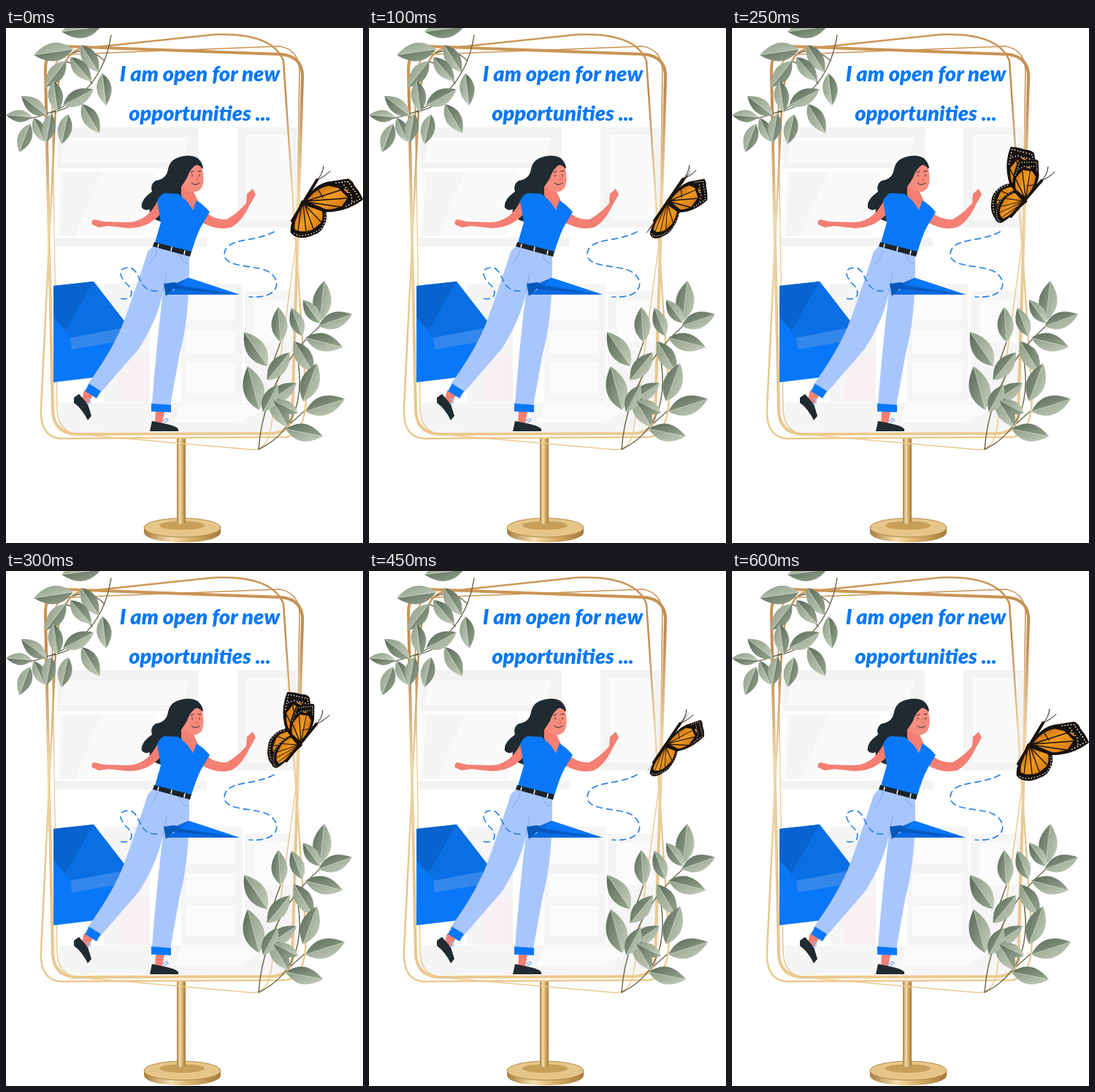
These frames come from a looping animation (489x705 px, 0.65 s). An HTML page:

```html
<!DOCTYPE html>
<html lang="en">
<meta charset="utf-8">
<title>Open for new opportunities</title>
<style>
html, body { margin: 0; width: 100%; height: 100%; overflow: hidden; background: #fff }
svg { display: block; width: 489px; height: 705px }
text { font: italic 900 29px Lato, "Open Sans", sans-serif; fill: #0878f8; text-anchor: middle }
.line { fill: none; stroke-linecap: round; stroke-linejoin: round }
</style>
<svg viewBox="0 0 489 705">
  <defs>
    <linearGradient id="gold" gradientUnits="userSpaceOnUse" x1="0" y1="20" x2="60" y2="570">
      <stop offset="0" stop-color="#cf9a58"/><stop offset=".2" stop-color="#c08a50"/>
      <stop offset=".45" stop-color="#f0d6a8"/><stop offset=".75" stop-color="#e6c48c"/>
      <stop offset="1" stop-color="#ecc98f"/>
    </linearGradient>
    <linearGradient id="metal">
      <stop offset="0" stop-color="#a87c3c"/><stop offset=".35" stop-color="#f3dfae"/>
      <stop offset=".6" stop-color="#d9b26c"/><stop offset="1" stop-color="#a5793a"/>
    </linearGradient>
    <linearGradient id="pale" x2="1" y2="1">
      <stop offset="0" stop-color="#8d9d87"/><stop offset="1" stop-color="#c3ccba"/>
    </linearGradient>
    <linearGradient id="deep" x2="1" y2="1">
      <stop offset="0" stop-color="#596b59"/><stop offset="1" stop-color="#98a690"/>
    </linearGradient>
    <linearGradient id="orange" x2="1" y2="1">
      <stop offset="0" stop-color="#b85a0c"/><stop offset=".5" stop-color="#ef9a20"/>
      <stop offset="1" stop-color="#cf7010"/>
    </linearGradient>
    <g id="wing">
      <path fill="#17110d" d="M405 236L438 249Q441 262 436 270Q432 280 422 283Q412 288 403 287Q394 286 390 280Q389 270 394 262Z"/>
      <path fill="url(#orange)" d="M405 241L433 251Q435 262 430 268L420 276Q406 281 396 276Q394 268 398 260Z"/>
      <path class="line" stroke="#17110d" stroke-width="1.3" d="M405 240L400 278M407 241L411 278M409 242L421 275M410 243L431 265"/>
      <path class="line" stroke="#fff" stroke-width="1.6" stroke-dasharray="0 4" d="M437 255Q438 266 432 274Q420 284 404 284Q396 284 393 279"/>
      <path fill="#17110d" d="M408 239Q420 216 440 211L469 207Q475 209 478 217Q486 226 489 235Q480 242 470 246Q455 252 438 252Z"/>
      <path fill="url(#orange)" d="M412 237Q423 220 442 216L455 219L468 232L460 244Q448 249 438 248Z"/>
      <path class="line" stroke="#17110d" stroke-width="1.4" d="M411 237L458 222M411 237L467 233M411 238L458 245M428 222L434 232"/>
      <path class="line" stroke="#fff" stroke-width="1.7" stroke-dasharray="0 4.2" d="M452 212L468 210Q474 218 485 234L464 245M463 215L473 229L474 238"/>
      <path class="line" stroke="#e08a20" stroke-width="2" d="M464 221l4 4"/>
    </g>
  </defs>

  <g id="room">
    <path fill="#f3f3f3" d="M70 136H264V192H70ZM66 287H275V299H66ZM317 136H398V273H317Z"/>
    <path fill="#fafafa" d="M82 150H250L240 184H75ZM72 196H205L190 285H72ZM330 146H391V262H330Z"/>
    <path fill="#f5f5f5" d="M78 197H132L94 285H74ZM134 350H197V512H134ZM240 350H324V512H240ZM327 360H398V512H327Z"/>
    <path fill="#fbfbfb" d="M247 364H314V401H247ZM247 414H314V446H247ZM247 458H314V500H247ZM339 372H390V430H339Z"/>
    <path fill="#f8f0f2" d="M155 447H197V512H155Z"/>
    <path fill="#f5f5f5" d="M72 513H390V553H72Z"/>
    <path fill="#fbfbfb" d="M240 515H365L320 540H230Z"/>
  </g>

  <g id="stand">
    <path fill="url(#metal)" d="M189 684V690C189 709 294 709 294 690V684Z"/>
    <ellipse cx="241.500" cy="684" rx="52.500" ry="13" fill="#e6c688" stroke="#b18a49"/>
    <ellipse cx="241" cy="681" rx="31" ry="6" fill="#c89f59"/>
    <path fill="url(#metal)" d="M234 562H246V677Q240 681 234 677Z"/>
  </g>

  <g class="line" stroke="url(#gold)">
    <path stroke-width="4" d="M78 25L378 36Q408 40 406 70L392 530Q390 553 365 555L95 556Q66 554 64 525L54 60Q53 28 78 25Z"/>
    <path stroke-width="2.500" d="M68 110Q72 32 105 28L285 9Q365 6 380 45L411 500Q411 555 385 560L75 562Q46 560 48 520Z"/>
    <path stroke-width="1.500" d="M63 85Q60 37 90 36L375 25Q402 30 402 60L398 290L364 540Q360 580 335 577L95 556Q70 550 70 520Z"/>
  </g>

  <text x="265.500" y="73">I am open for new</text>
  <text x="265.500" y="127">opportunities ...</text>

  <g id="box">
    <path fill="#0878f8" d="M65 353L120 347L168 409L167 432L141 476L65 485Z"/>
    <path fill="#0763cd" d="M65 353L120 347L82 415L65 396Z"/>
    <path fill="#0a6fe4" d="M120 347L168 409L88 424L80 415L102 382Z"/>
    <path fill="#3387ea" d="M88 424L168 409L167 427L90 440Z"/>
  </g>

  <g id="woman">
    <path fill="#1f2b31" d="M270 191Q266 173 246 175Q225 177 222 193Q220 207 205 209Q197 214 200 224Q184 235 186 246Q190 251 197 248Q194 260 212 265Q232 260 243 226Z"/>
    <path fill="#f47f72" d="M208 236C196 260 180 266 165 266L134 265L121 262Q116 264 118 269L127 273L140 271L168 274C190 274 204 264 214 252ZM276 254Q288 263 302 262Q317 254 329 240L330 227L338 220L342 228L334 242Q322 267 308 273Q290 278 268 266Z"/>
    <path fill="#f47f72" d="M240 213L240 229L256 249L263 237L256 222Z"/>
    <path fill="#f78c7e" d="M246 191Q264 183 269 193Q273 211 267 220Q257 229 246 220Q239 217 241 208Z"/>
    <path fill="#1f2b31" d="M267 184Q253 189 248 205Q240 219 234 223L231 193Q240 176 258 177Z"/>
    <path class="line" stroke="#1f2b31" d="M253 198l4 -2M263 196l4 0M255 201v2M265 201v2M254 212Q259 217 265 212"/>
    <path class="line" stroke="#e16962" d="M261 202l2 6h-3"/>
    <path fill="#0878f8" d="M207 237Q210 229 217 226L236 227Q248 235 256 249L261 236Q272 243 279 252L267 272Q260 286 254 307L204 294L212 266Z"/>
    <path fill="#a8c6fc" d="M202 298L251 311Q252 395 238 445L225 517L200 515Q206 435 215 362Q207 400 182 439L129 500L111 489Q148 438 162 400Q183 342 194 306Z"/>
    <path class="line" stroke="#7ea9ee" d="M215 362L220 336M207 304Q203 318 196 323M238 310Q240 321 249 322"/>
    <path fill="#1c2429" d="M203 293L254 306L252 313L201 299Z"/>
    <path class="line" stroke="#fff" stroke-width="1.500" d="M209 296l-1 4M227 300l-1 5M245 305l-1 5"/>
    <path fill="#f47f72" d="M107 496L119 503L112 515L104 508ZM205 525H217L214 541H204Z"/>
    <path fill="#0878f8" d="M114 487L130 497L124 507L108 497ZM199 514L226 516V526L199 525Z"/>
    <path fill="#1f2b31" d="M93 506L100 501L112 515L117 531L112 537Q104 521 93 513ZM200 538L215 541Q232 544 236 549V552H197Z"/>
    <path class="line" stroke="#8db9f7" stroke-width="1.500" d="M111 509q5 -3 4 4l-4 1M215 538q6 -6 7 -1l-5 3"/>
  </g>

  <g id="plane">
    <path class="line" stroke="#2b83e6" stroke-width="1.700" stroke-dasharray="8 6" d="M367 279C340 294 300 286 299 310C300 330 345 323 362 335C380 350 370 371 333 368M207 360C180 362 185 330 169 328C150 328 157 342 165 350C178 362 172 376 152 369"/>
    <path fill="#0a6ae0" d="M231 350L250 342L320 365L217 365L231 358Z"/>
    <path fill="#0758bc" d="M216 350L231 348L239 353L320 365L230 357L219 367Z"/>
    <path fill="#0878f8" d="M250 342L320 365L240 352Z"/>
  </g>

  <g id="leaves">
    <path class="line" stroke="#6d6a50" stroke-width="1.500" d="M144 10C136 60 108 108 32 124M135 45Q115 25 92 34M118 76Q100 50 82 46M103 97Q85 112 55 117M346 577C350 520 375 450 440 400M346 577C400 550 412 500 395 430M385 545L362 505M358 480L376 430M408 525L390 541"/>
  </g>

  <g id="butterfly">
    <use href="#wing"/><use href="#wing"/>
    <path class="line" stroke="#1b130e" stroke-width="4"/>
    <path class="line" stroke="#1b130e"/>
  </g>
</svg>
<script>
// Each leaf: base x, y, tip x, y
const topLeaves = [
  92, 29, 38, 37, 103, 23, 127, 61, 130, -2, 76, 5, 82, 45, 54, 81, 88, 40, 117, 73,
  132, 62, 137, 106, 65, 72, 71, 116, 56, 120, 21, 93, 78, 106, 120, 84, 104, 104, 128, 144,
  36, 122, 0, 119, 33, 131, 18, 170, 38, 123, 53, 156, 62, 117, 55, 157, 85, 118, 76, 159];
const lowLeaves = [
  430, 401, 436, 346, 430, 404, 407, 372, 428, 408, 474, 392, 410, 424, 461, 437, 406, 422, 391, 383,
  376, 430, 373, 382, 358, 463, 326, 416, 395, 429, 421, 472, 358, 482, 389, 444, 407, 511, 426, 459,
  347, 523, 331, 463, 360, 511, 398, 486, 362, 503, 387, 547, 410, 525, 464, 508, 383, 549, 434, 559,
  352, 526, 372, 488, 400, 527, 366, 510];

function leaf([x, y, tipX, tipY]) {
  const dx = tipX - x, dy = tipY - y;
  const half = side =>
    `M${x} ${y}Q${x + dx * .45 - dy * .46 * side} ${y + dy * .45 + dx * .46 * side} ${tipX} ${tipY}Z`;
  return `<path fill="url(#pale)" d="${half(1)}"/><path fill="url(#deep)" d="${half(-1)}"/>
    <path class="line" stroke="#d5dccb" stroke-width=".6" d="M${x} ${y}L${tipX} ${tipY}"/>`;
}
const all = [...topLeaves, ...lowLeaves];
let markup = "";
for (let i = 0; i < all.length; i += 4) markup += leaf(all.slice(i, i + 4));
document.getElementById("leaves").insertAdjacentHTML("beforeend", markup);

// Time, then tail, head, near wing tip and far wing tip
const poses = [
  [0, 392, 264, 424, 212, 480, 214, 479, 213],
  [100, 391, 264, 428, 211, 464, 214, 440, 197],
  [150, 386, 262, 424, 212, 447, 202, 427, 182],
  [250, 382, 258, 422, 213, 412, 178, 404, 164],
  [350, 386, 262, 424, 214, 419, 182, 409, 168],
  [450, 390, 262, 424, 213, 459, 209, 438, 194],
  [600, 392, 264, 424, 212, 480, 214, 479, 213],
  [650, 392, 264, 424, 212, 480, 214, 479, 213]];

const basis = (tx, ty, hx, hy, px, py) =>
  new DOMMatrix([hx - tx, hy - ty, px - tx, py - ty, tx, ty]);
const rest = basis(392, 264, 424, 212, 480, 214).inverse();
const [far, near, body, feelers] = document.getElementById("butterfly").children;

function draw(now) {
  const time = Math.floor(now % 650 / 50) * 50;
  const i = poses.findIndex(pose => pose[0] > time);
  const a = poses[i - 1], b = poses[i];
  const k = (time - a[0]) / (b[0] - a[0]);
  const [tx, ty, hx, hy, nx, ny, fx, fy] = a.map((v, j) => v + (b[j] - v) * k).slice(1);
  const place = (wing, x, y) =>
    wing.setAttribute("transform", basis(tx, ty, hx, hy, x, y).multiply(rest));
  place(near, nx, ny);
  place(far, fx, fy);
  body.setAttribute("d", `M${tx} ${ty}L${hx + 2} ${hy - 4}`);
  feelers.setAttribute("d", `M${hx + 2} ${hy - 4}q8 -8 9 -19M${hx + 2} ${hy - 4}q11 -5 18 -12`);
  requestAnimationFrame(draw);
}
draw(performance.now());
</script>
</html>
```
